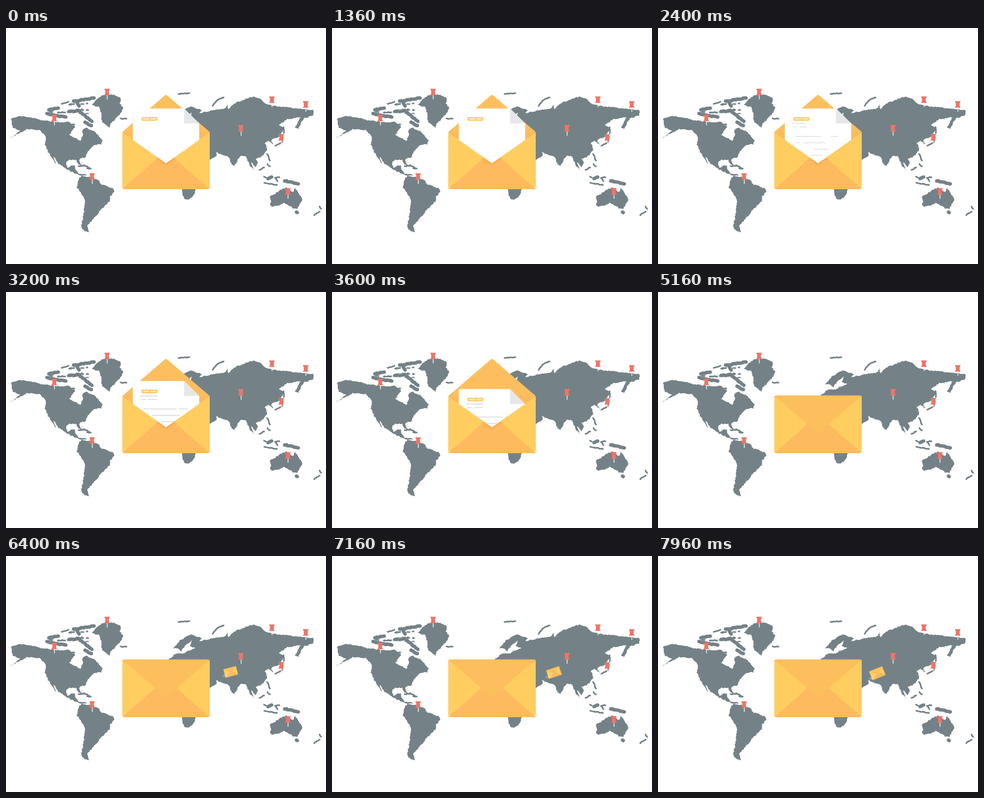
An HTML page that plays this animation: 600x445 px, repeating every 8 s.

```html
<!DOCTYPE html>
<html lang="en">
<head>
<meta charset="utf-8">
<title>Mail around the world</title>
<style>
html, body { margin: 0; width: 100%; height: 100%; overflow: hidden; background: #fff; }
svg { display: block; width: 600px; height: 445px; }
.land { fill: #748287; }
.isles { fill: none; stroke: #748287; stroke-width: 3; stroke-linecap: round; stroke-linejoin: round; }
.isles .wide { stroke-width: 6.5; }
.pin { fill: #ef7467; }
.gold { fill: #ffcd60; }
.amber { fill: #fdba5e; }
.flap { fill: #fdbf5e; animation: fold 8s infinite; }
.letter { animation: slide 8s linear infinite; }
.lines { fill: #d2d4d6; animation: show 8s linear infinite; }
.lines rect { height: 1.4px; transform-box: fill-box; transform-origin: 0 50%; animation: grow 8s linear infinite; }
.mails { animation: gate 8s step-end infinite; }
.mail { opacity: 0; animation: fly 8s linear infinite; }
@keyframes fold {
  0%, 45.5% { transform: scaleY(1); animation-timing-function: ease-in; }
  50.5% { transform: scaleY(.186); animation-timing-function: cubic-bezier(.3, .4, .6, 1); }
  54%, 100% { transform: scaleY(-1); }
}
@keyframes slide {
  0%, 33% { transform: translateY(0); animation-timing-function: cubic-bezier(.4, .2, .8, .7); }
  40% { transform: translateY(16px); }
  50.5% { transform: translateY(48px); }
  52.5%, 100% { transform: translateY(54px); }
}
@keyframes show { 0%, 20% { opacity: 0; } 33%, 100% { opacity: 1; } }
@keyframes grow { 0%, 20% { transform: scaleX(0); } 33%, 100% { transform: scaleX(1); } }
@keyframes gate { 0% { visibility: hidden; } 56% { visibility: visible; } }
@keyframes fly {
  0% { opacity: 1; transform: translate(372px, 242px) rotate(-35deg) scale(.18); }
  2% { transform: translate(411px, 221px) rotate(-22deg) scale(.162); }
  3% { transform: translate(421px, 218.5px) rotate(-15deg) scale(.148); }
  5.5% { transform: translate(468px, 209px) rotate(0deg) scale(.12); }
  7.9% { opacity: 1; transform: translate(515px, 212px) rotate(15deg) scale(.07); }
  7.95%, 100% { opacity: 0; transform: translate(515px, 212px) scale(.07); }
}
</style>
</head>
<body>
<svg viewBox="0 0 600 445">
  <defs>
    <clipPath id="inside"><rect x="218" y="100" width="164" height="200"/></clipPath>
    <clipPath id="front"><rect x="-84" width="168" height="90"/></clipPath>
    <path id="fold" d="M-82 0L-2 -69Q0 -71 2 -69L82 0z"/>
    <g id="pin">
      <path d="M-.5 11h1.5v9h-1.5z" fill="#eceeee"/>
      <path class="pin" d="M-5 0H5V2L3.6 3V9.5L5 11V12.3H-5V11L-3.6 9.5V3L-5 2z"/>
    </g>
    <g id="closed">
      <rect class="gold" x="-82" y="-54.5" width="164" height="109" rx="4"/>
      <path class="amber" d="M-80 54.5L0 -15L80 54.5z"/>
      <path d="M-81 -53L0 15L81 -53L79 -54.5H-79z" fill="#fdbf5e"/>
      <path d="M-120 22H-50M-108 38H-40M-40 6H-10" stroke="#fff" stroke-width="4" opacity=".75"/>
    </g>
  </defs>

  <g class="land">
    <path id="north-america" d="M10 171 24 166 50 169 66 174 100 178 118 177 130 186 118 201 125 206 140 212 145 200 143 193 149 188 166 195 181 212 178 219 165 221 150 237 149 243 137 249 143 260 136 257 132 249 118 249 113 255 115 263 124 259 129 259 129 265 136 274 151 277 140 279 115 267 98 256 90 243 93 257 80 236 73 221 76 206 64 193 40 191 8 207 26 194 12 187z"/>
    <path id="south-america" d="M137 283 142 279 156 281 175 288 178 294 201 303 202 310 195 318 194 327 179 341 168 355 153 373 155 384 148 383 141 375 146 345 148 322 133 301z"/>
    <path id="greenland" d="M160 144 167 138 182 126 203 125 215 133 214 142 219 150 214 163 197 180 194 188 181 178 176 150z"/>
    <path id="eurasia" d="M303 197 319 183 334 184 345 177 355 174 343 170 349 159 337 168 329 180 325 175 314 174 327 158 346 148 367 155 362 161 386 155 410 152 416 145 417 154 428 142 463 129 477 133 490 145 530 150 577 155 577 164 558 171 548 189 542 188 552 168 528 172 512 183 521 190 513 205 480 215 320 230z"/>
    <path id="south-asia" d="M380 200 510 203 497 212 501 219 492 212 485 216 490 229 483 240 469 247 472 255 468 262 459 253 466 270 456 257 450 242 440 241 428 259 423 257 417 243 394 235 396 241 376 252z"/>
    <path id="africa" d="M327 298 334 322 342 323 350 318 360 298z"/>
    <path id="australia" d="M495 318 519 303 526 301 538 309 542 302 556 323 547 340 538 340 522 330 502 337 495 335 497 327z"/>
  </g>
  <g class="isles">
    <path id="arctic" class="wide" d="M127 138 165 132M132 138 137 147M118 158 136 156 146 164 161 176M148 178 160 184M76 162 92 165 112 168M80 154 98 151"/>
    <path id="north" d="M104 143 117 139M119 144 128 143M103 159 111 159M123 182 128 182M215 171 226 171M324 124 344 123M387 146 396 136 408 131"/>
    <path id="caribbean" d="M137 261 147 259 156 264M152 265 159 265"/>
    <path id="east" d="M520 187 521 198M520 205 517 216 505 222M490 237 495 250M490 257 495 261M475 268 484 263"/>
    <path id="south" d="M484 281 487 282M485 292 508 296M513 281 505 282 509 289M588 337 591 341M588 346 578 353"/>
    <path id="big-isles" class="wide" d="M491 284 498 281M523 288 548 294M545 347 546 348"/>
  </g>
  <g id="specks" class="land"></g>
  <g id="pins"></g>
  <g id="mails" class="mails"></g>

  <g transform="translate(300 196)"><use class="flap" href="#fold"/></g>
  <path d="M218 197L222 195H378L382 197V290H218z" class="amber"/>
  <g clip-path="url(#inside)">
    <g class="letter">
      <path d="M238 152H334L362 180V262H238z" fill="#fff" stroke="#f3f3f3" stroke-width=".6"/>
      <path d="M334 152V180H362z" fill="#e6e7e9"/>
      <rect x="254" y="168" width="30" height="7" rx="2" fill="#fdcb74"/>
      <path d="M257 171.5H268M271 171.5H281" stroke="#fff" stroke-width="1.4"/>
      <g class="lines">
        <rect x="251" y="179.3" width="33"/>
        <rect x="253" y="185.8" width="9"/>
        <rect x="266" y="185.8" width="17"/>
        <rect x="258" y="203.8" width="62"/>
        <rect x="324" y="203.8" width="17"/>
        <rect x="258" y="215.8" width="10"/>
        <rect x="273" y="215.8" width="52"/>
        <rect x="292" y="227.8" width="36"/>
        <rect x="285" y="239.3" width="30"/>
      </g>
    </g>
  </g>
  <path class="gold" d="M218 197L300 255L382 197V300Q382 304 378 304H222Q218 304 218 300z"/>
  <path class="amber" d="M219.5 303L284 245.5L300 257L316 245.5L380.5 303L378 304H222z"/>
  <path d="M284 244L300 255L316 244L318 247L300 260L282 247z" fill="#f9b057"/>
  <g transform="translate(300 195.5)" clip-path="url(#front)"><use class="flap" href="#fold"/></g>
</svg>
<script>
const $ = id => document.getElementById(id);
let seed = 7;
const rnd = () => (seed = seed * 16807 % 2147483647) / 2147483647 - .5;

// Breaks straight edges into small bays.
function roughen(path, amount) {
  const source = path.getAttribute('d');
  const closed = source.endsWith('z');
  const parts = source.split('M').slice(1).map(part => {
    const n = part.match(/[\d.]+/g).map(Number);
    const pts = [];
    for (let i = 0; i < n.length; i += 2) pts.push([n[i], n[i + 1]]);
    if (closed) pts.push(pts[0]);
    const out = [];
    for (let i = 1; i < pts.length; i++) {
      const [x, y] = pts[i - 1], [u, v] = pts[i];
      const steps = Math.max(1, Math.round(Math.hypot(u - x, v - y) / 2.8));
      for (let k = 0; k < steps; k++) {
        const p = k / steps;
        out.push((x + (u - x) * p + rnd() * amount).toFixed(1) + ' ' + (y + (v - y) * p + rnd() * amount).toFixed(1));
      }
    }
    if (!closed) out.push(pts[pts.length - 1].join(' '));
    return 'M' + out.join('L');
  });
  path.setAttribute('d', parts.join('') + (closed ? 'z' : ''));
}
document.querySelectorAll('.land path').forEach(p => roughen(p, 2.2));
document.querySelectorAll('.isles path').forEach(p => roughen(p, 1.6));

// Small arctic islands along a slanted band
for (let i = 0; i < 16; i++) {
  const x = 120 + rnd() * 76, y = 154 - (x - 120) * .15 + rnd() * 24;
  $('specks').innerHTML += `<ellipse cx="${x}" cy="${y}" rx="${3 + rnd() * 3}" ry="${1.5 + rnd()}"/>`;
}

const pins = [[189.5, 114.5], [90.5, 163.5], [161.5, 274], [440.5, 183], [498.5, 129], [562, 138], [516, 200], [528.5, 302]];
$('pins').innerHTML = pins.map(([x, y]) => `<use href="#pin" x="${x}" y="${y}"/>`).join('');

const starts = [4.52, 5.4, 6.16, 6.96, 7.8];
$('mails').innerHTML = starts.map(s => `<g class="mail" style="animation-delay:${s}s"><use href="#closed"/></g>`).join('');
</script>
</body>
</html>
```
